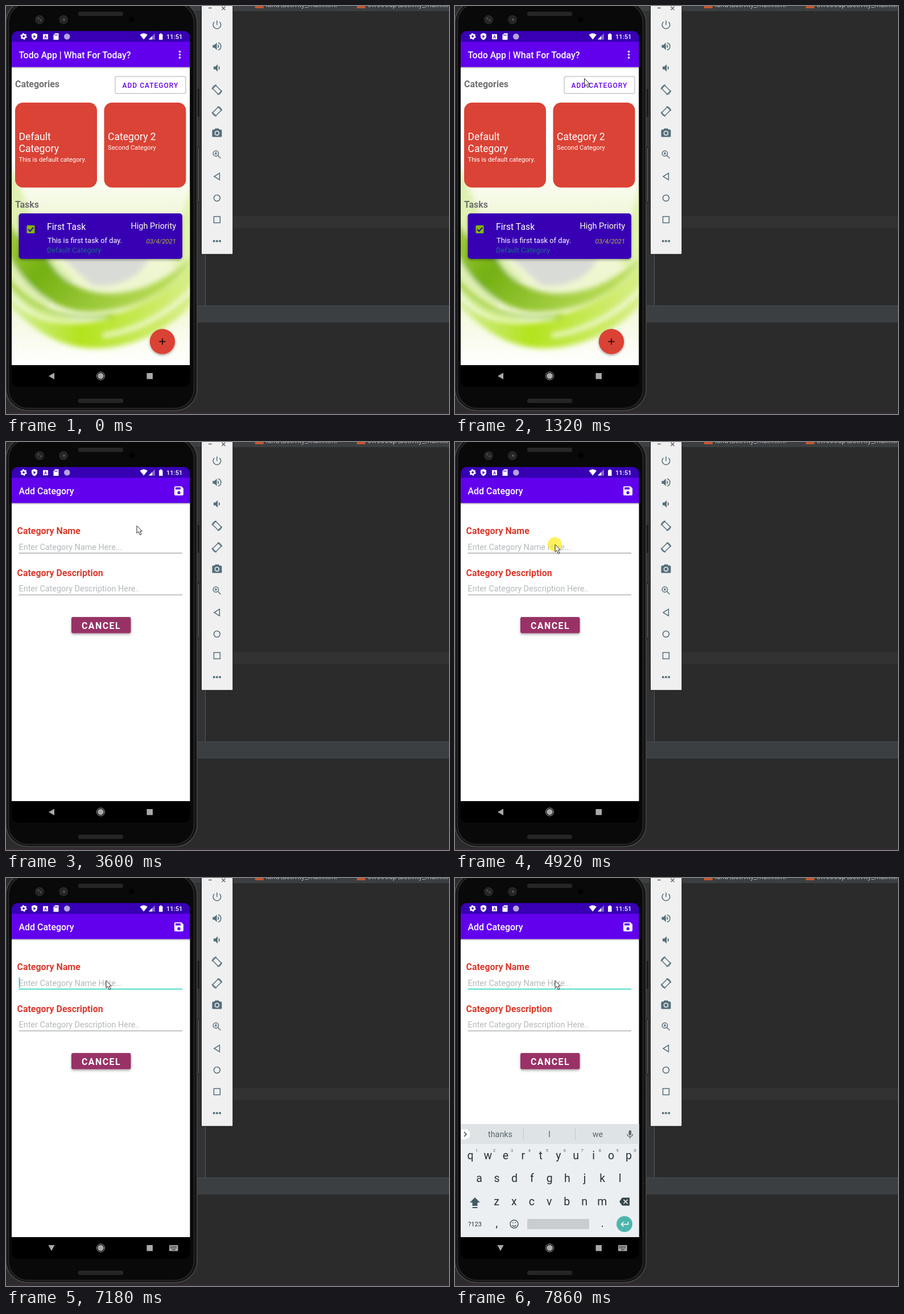
An HTML page that plays this animation: 779 px wide and 718 px high, repeating every 8 s.

```html
<!DOCTYPE html>
<html lang="en">
<head>
<meta charset="utf-8">
<title>Todo App</title>
<style>
  html, body { margin: 0; width: 100%; height: 100%; overflow: hidden; background: #2b2b2b; }
  svg { display: block; width: 100vw; height: 100vh; }
  text { font-family: Roboto, sans-serif; font-size: 11.2px; fill: #fff; white-space: pre; }
  .bold { font-size: 15.95px; font-weight: 700; }
  .title { font-size: 15.95px; font-weight: 500; }
  .gray { fill: #707070; }
  .red { fill: #d93a2d; }
  .card { font-size: 17.6px; }
  .body { font-size: 12.8px; }
  .hint { font-size: 14.4px; fill: #b3b8bb; }
  .mid { text-anchor: middle; }
  .end { text-anchor: end; }
  .line { fill: none; stroke-width: 1.5; }
  #keyboard text { fill: #263238; text-anchor: middle; }
  #keyboard .word { font-size: 14.4px; fill: #5b686e; }
  #keyboard .key { font-size: 19.5px; }
  #keyboard .digit { font-size: 8px; fill: #607078; }
</style>
</head>
<body>
<svg viewBox="0 0 779 718" preserveAspectRatio="none">
  <defs>
    <clipPath id="screen"><rect x="10" y="44" width="313.5" height="626" rx="11"/></clipPath>
    <clipPath id="content"><path d="M10 107H323.500V632H10Z"/></clipPath>
    <filter id="soft" x="-20%" y="-20%" width="140%" height="140%"><feGaussianBlur stdDeviation="5"/></filter>
    <filter id="shadow" x="-30%" y="-30%" width="160%" height="170%">
      <feDropShadow dx="0" dy="2" stdDeviation="2" flood-opacity=".35"/>
    </filter>
    <linearGradient id="wall" x1="0" y1="0" x2="0" y2="1">
      <stop offset=".33" stop-color="#fff"/><stop offset=".5" stop-color="#f0f7d8"/>
      <stop offset=".75" stop-color="#eef6cf"/><stop offset="1" stop-color="#fff"/>
    </linearGradient>
    <linearGradient id="green" x1="0" y1="0" x2="1" y2=".4">
      <stop stop-color="#a9d046"/><stop offset=".35" stop-color="#74b011"/><stop offset="1" stop-color="#b9dc58"/>
    </linearGradient>
    <linearGradient id="lime" x1="0" y1="0" x2="1" y2="0">
      <stop stop-color="#d5eda0"/><stop offset=".4" stop-color="#b3e31c"/><stop offset="1" stop-color="#d8ee8a"/>
    </linearGradient>
    <linearGradient id="drop" x1="0" y1="0" x2="0" y2="1">
      <stop stop-color="#000" stop-opacity=".3"/><stop offset="1" stop-color="#000" stop-opacity="0"/>
    </linearGradient>
  </defs>

  <!-- editor -->
  <path fill="#2b2b2b" d="M0 0H779V718H0Z"/>
  <path fill="#313335" d="M330 10h21V528h-21z"/>
  <path fill="#3c3f41" d="M320 0H779V9H320Z"/>
  <path fill="#323232" d="M337 370H779v21H337z"/>
  <path stroke="#55585a" d="M350.500 437v91"/>
  <path fill="#3c3f41" d="M330 528H779v29H330z"/>
  <path fill="#4a4c4e" d="M330 527H779v1H330z"/>
  <path fill="#352c32" d="M0 715H779v3H0z"/>
  <path fill="#c6562f" d="M438 0h15v4h-15zM617 0h15v4h-15z"/>
  <g style="--c:#aaa">
    <text x="457" y="2" style="font-size:12.500px;fill:#b0b3b5">land\activity_main.xml</text>
    <text x="636" y="2" style="font-size:12.500px;fill:#b0b3b5">sw600dp\activity_main.xml</text>
  </g>

  <!-- emulator toolbar -->
  <path fill="#f0f0f0" stroke="#0c0c0c" d="M343.500-2h55.500V437h-55.500z"/>
  <path class="line" stroke="#666" stroke-width="1" d="M356 3.500h6M379.500 1l6 6m0-6l-6 6"/>
  <g fill="#546e7a" stroke="#546e7a" stroke-width="0" id="tools">
    <path class="line" stroke-width="2" d="M371 25.500v8M366.500 28a6.800 6.800 0 1 0 9 0"/>
    <path d="M363.500 68.500h3.200l4-4v13l-4-4h-3.200zM372.500 67.500a4 4 0 0 1 0 7z"/>
    <path class="line" d="M373 64.700a6.600 6.600 0 0 1 0 12.800"/>
    <path d="M365 106.500h3.200l4-4v13l-4-4H365zM374 105.500a4 4 0 0 1 0 7z"/>
    <g id="rotate">
      <rect class="line" x="-4" y="-7" width="8" height="14" rx="1" transform="rotate(-45)"/>
      <path class="line" d="M-8.500-1A8.500 8.500 0 0 1-1-8.500M8.500 1A8.500 8.500 0 0 1 1 8.500"/>
    </g>
    <path fill-rule="evenodd" d="M368 215.500h6l1.500 2h2.500q1.500 0 1.500 1.500v10q0 1.500-1.500 1.500h-14q-1.500 0-1.500-1.500v-10q0-1.500 1.500-1.500h2.500zM371 219.500a4.300 4.300 0 1 0 .1 0z"/>
    <circle cx="371" cy="223.800" r="2.700"/>
    <circle class="line" cx="369" cy="259.500" r="4.700"/>
    <path class="line" d="M372.500 263l5 5M366.800 259.500h4.400M369 257.300v4.400"/>
    <path class="line" d="M375.500 294v12l-9.500-6z"/>
    <circle class="line" cx="371" cy="338" r="5.500"/>
    <path class="line" d="M365.500 370.500h11v11h-11z"/>
    <path d="M364 412h3.500v3.500H364zM369.200 412h3.500v3.500h-3.500zM374.500 412h3.500v3.500h-3.500z"/>
  </g>

  <!-- phone body -->
  <path fill="#1b1b1b" d="M335 146h5v49h-5zM335 247h5V347h-5z"/>
  <path stroke="#777" d="M338.500 249v96"/>
  <rect x="0" y="-9" width="336" height="721" rx="38" fill="#151515" stroke="#484848" stroke-width="1.500"/>
  <rect x="4.500" y="-5" width="326" height="713" rx="34" fill="#090909" stroke="#2c2c2c" stroke-width="1.500"/>
  <g fill="#262626">
    <rect x="127" y="10" width="79" height="7.500" rx="3"/>
    <rect x="127" y="691" width="79" height="7.500" rx="3"/>
    <circle cx="59" cy="24" r="8"/><circle cx="101" cy="24" r="8"/>
  </g>
  <g fill="#555">
    <circle cx="57" cy="22" r="1.500"/><circle cx="61" cy="25" r="1.500"/>
    <circle cx="102" cy="24" r="2"/>
  </g>
  <circle cx="221" cy="24" r="5" fill="#020202"/>

  <g clip-path="url(#screen)">
    <path d="M10 44H324V670H10Z"/>

    <g id="home" clip-path="url(#content)">
      <path fill="url(#wall)" d="M10 107H324V632H10Z"/>
      <g filter="url(#soft)">
        <path fill="#dff0b2" d="M0 270C30 310 40 400 120 480L60 540 0 500Z"/>
        <path fill="#e2f2b0" d="M335 290C315 350 300 400 290 450L335 520Z"/>
        <path fill="#d9dbd6" d="M95 440H250C245 475 190 500 150 490Z"/>
        <path fill="url(#lime)" d="M0 470C50 550 120 560 180 545S290 500 330 450V520C290 570 220 605 150 602S40 560 0 520Z"/>
        <path fill="url(#green)" d="M0 375C30 420 50 430 72 440 95 490 150 512 200 505 250 500 290 475 330 440 290 510 210 540 140 538 80 535 30 490 0 430Z"/>
      </g>
      <g class="line" filter="url(#soft)" style="opacity:.8">
        <path class="line" stroke="#fff" style="stroke-width:7" d="M0 500C50 565 120 560 175 548"/>
        <path class="line" stroke="#f5fae6" style="stroke-width:9" d="M335 490C290 540 230 572 170 580"/>
        <path class="line" stroke="#8fc41e" style="stroke-width:6" d="M0 480C50 540 110 555 190 545"/>
      </g>
      <text class="bold gray" x="16" y="143">Categories</text>
      <g id="addButton">
        <rect x="192" y="124" width="124" height="30" rx="3" fill="#fff" stroke="#c9c9c9" stroke-width="1.500"/>
        <text x="204.500" y="143.500" style="font-size:12px;font-weight:500;letter-spacing:1px;fill:#6200ee">ADD CATEGORY</text>
      </g>
      <g fill="#da4336">
        <rect x="16" y="170" width="144" height="149.500" rx="14"/>
        <rect x="172.500" y="170" width="144" height="149.500" rx="14"/>
      </g>
      <text class="card" x="22.500" y="236">Default</text>
      <text class="card" x="22.500" y="257">Category</text>
      <text x="22.500" y="274">This is default category.</text>
      <text class="card" x="179" y="236">Category 2</text>
      <text x="179" y="253">Second Category</text>
      <text class="bold gray" x="16" y="355">Tasks</text>
      <rect x="22.500" y="365" width="287.500" height="80" rx="5" fill="#3700b3" filter="url(#shadow)"/>
      <rect x="36.500" y="386" width="14" height="14" rx="1.500" fill="#7fb800"/>
      <path class="line" stroke="#3700b3" style="stroke-width:2" d="M39 393l3.300 3.300 6-6.500"/>
      <text x="72" y="394" style="font-size:15.800px">First Task</text>
      <text class="end" x="299" y="392" style="font-size:14.500px;fill:#fffde4">High Priority</text>
      <text class="body" x="73" y="417">This is first task of day.</text>
      <text class="end" x="299" y="418" style="font-size:11.400px;font-style:italic;fill:#b2b63c">03/4/2021</text>
      <text class="body" x="72" y="434" style="fill:#1c6a8c">Default Category</text>
      <circle cx="275" cy="590.500" r="22.200" fill="#da4336" filter="url(#shadow)"/>
      <path class="line" stroke="#000" d="M269.500 590.500h11m-5.500-5.500v11"/>
    </g>

    <g id="form">
      <path fill="#fff" d="M10 107H324V632H10Z"/>
      <text class="bold red" x="19.500" y="162">Category Name</text>
      <text class="hint" x="22.500" y="190">Enter Category Name Here...</text>
      <path id="nameLine" d="M22.500 195.500H310"/>
      <path id="caret" fill="#1ccfbd" d="M22.700 174.500h1.600v19h-1.600z"/>
      <text class="bold red" x="19.500" y="235.500">Category Description</text>
      <text class="hint" x="22.500" y="263">Enter Category Description Here..</text>
      <path stroke="#8b8b8b" d="M22.500 269H310"/>
      <rect x="115" y="308" width="104.500" height="28.500" rx="3" fill="#983066" filter="url(#shadow)"/>
      <text class="bold" x="133" y="328.500" style="letter-spacing:1.420px">CANCEL</text>
    </g>

    <!-- status and app bars -->
    <path fill="#3700b3" d="M10 44H324V63H10Z"/>
    <path fill="#6200ee" d="M10 63H324v44.500H10Z"/>
    <path fill="url(#drop)" d="M10 107.500H324v3H10Z"/>
    <g fill="#fff">
      <circle cx="31" cy="53.500" r="3.200" fill="none" stroke="#fff" stroke-width="2.600"/>
      <circle cx="31" cy="53.500" r="5" fill="none" stroke="#fff" stroke-width="1.600" stroke-dasharray="2.600 2.636"/>
      <path fill-rule="evenodd" d="M50 47.500l5 2v4q0 4-5 6.500-5-2.500-5-6.500v-4zM48.500 51v5.500l4-2.700z"/>
      <path d="M65 49.500h9v9h-9z"/>
      <path d="M86.500 48h6v11.500h-9V51z"/>
      <circle cx="107.300" cy="53.700" r="5.300" fill="#b5a3e0"/>
      <path d="M235.500 50.500q6.700-5 13.400 0l-6.700 8.500z"/>
      <path d="M262 48v11h-11z" opacity=".4"/><path d="M257 53v6h-6z"/>
      <path d="M269 49.500h2v-1.300h2.500v1.300h2v10H269z"/>
      <circle cx="305.500" cy="80.300" r="1.800" class="dot"/><circle cx="305.500" cy="85.600" r="1.800" class="dot"/><circle cx="305.500" cy="90.900" r="1.800" class="dot"/>
      <path id="save" fill-rule="evenodd" d="M298 78h10.500l3.500 3.500V92q0 2-2 2h-12q-2 0-2-2V80q0-2 2-2zM298 79.800v3.600h9v-3.600zM304 86.600a2.700 2.700 0 1 0 .1 0z"/>
    </g>
    <path stroke="#6200ee" d="M67.500 57l2-5.500 2 5.500m-3.300-2h2.600" fill="none"/>
    <path stroke="#3700b3" d="M86 50v2.500m2-2.500v2.500m2-2.500v2.500"/>
    <text x="282" y="57.500" style="font-weight:500">11:51</text>
    <text id="heading" class="title" x="22.500" y="91.500"></text>

    <g id="keyboard">
      <path fill="#eceff1" d="M10 433H324V632H10Z"/>
      <path fill="#dee3e6" d="M10 433H324v35H10Z"/>
      <circle cx="17" cy="451" r="9.500" fill="#fff"/>
      <path class="line" stroke="#37474f" d="M16 447l4 4-4 4"/>
      <path stroke="#c0c8cc" d="M120.500 441v20M211.500 441v20"/>
      <rect x="305.500" y="444" width="4.500" height="9" rx="2.200" fill="#5b686e"/>
      <path class="line" stroke="#5b686e" d="M303 450.500a4.700 4.700 0 0 0 9.400 0M307.700 455v3.500"/>
      <path fill="#455a64" d="M35 562l9 9h-4.500v6h-9v-6H26zM30.500 579h9v2h-9z"/>
      <path fill="#37474f" d="M294 562.500h13v14h-13l-5-7z"/>
      <path class="line" stroke="#fff" d="M296.500 566l7 7m0-7l-7 7"/>
      <circle class="line" cx="104" cy="609" r="7" stroke="#455a64"/>
      <path class="line" stroke="#455a64" d="M100.500 611q3.500 4 7 0M101 606.500h1.800m2.400 0h1.800"/>
      <rect x="127" y="600" width="109" height="18" rx="2" fill="#c9cdcf"/>
      <circle cx="298" cy="609" r="14" fill="#4db6ac"/>
      <path class="line" stroke="#fff" d="M304.500 605v4.500h-12m4-4l-4 4 4 4"/>
    </g>

    <!-- navigation bar -->
    <g fill="#a9a9a9">
      <path id="back"/>
      <circle cx="166.500" cy="651" r="5.300"/>
      <circle class="line" cx="166.500" cy="651" r="7" stroke="#a9a9a9" style="stroke-width:1"/>
      <path d="M247.500 646h10.500v10.500h-10.500z"/>
      <g id="imeIcon">
        <rect x="287" y="646" width="15.500" height="10.500" rx="1"/>
        <path fill="none" stroke="#111" stroke-width="1.400" stroke-dasharray="1.400 1" d="M288.700 648.500h12M288.700 651h12"/>
        <path stroke="#111" d="M291.500 654h6.500"/>
      </g>
    </g>
  </g>

  <g id="cursor">
    <circle id="press" r="12.500" fill="#ffec28" opacity=".75"/>
    <path fill="#fff" stroke="#222" d="M.5.5V13.500L3.500 10.800 6 16.500 8.500 15.400 6 10H10Z"/>
  </g>
</svg>
<script>
const LOOP = 8000;
const $ = id => document.getElementById(id);
const show = (el, visible) => { el.style.display = visible ? '' : 'none'; };
const within = (t, from, to) => t >= from && t < to;

// Second rotate icon is the mirror of the first.
const rotate = $('rotate');
const mirrored = rotate.cloneNode(true);
mirrored.removeAttribute('id');
rotate.setAttribute('transform', 'translate(371 147.500)');
mirrored.setAttribute('transform', 'translate(371 185.500) scale(-1 1)');
$('tools').append(mirrored);

function addKey(label, x, y, kind) {
  const el = document.createElementNS('http://www.w3.org/2000/svg', 'text');
  el.textContent = label;
  el.setAttribute('x', x);
  el.setAttribute('y', y);
  el.setAttribute('class', kind);
  $('keyboard').append(el);
}
const addRow = (keys, x, y) => [...keys].forEach((key, i) => addKey(key, x + i * 30.95, y, 'key'));
addRow('qwertyuiop', 27, 495);
addRow('asdfghjkl', 42.5, 535);
addRow('zxcvbnm', 73, 576);
[...'1234567890'].forEach((d, i) => addKey(d, 38 + i * 30.95, 482, 'digit'));
addKey('thanks', 79.5, 456, 'word');
addKey('I', 166, 456, 'word');
addKey('we', 251, 456, 'word');
addKey('?123', 35, 613, '');
addKey(',', 73.5, 614, 'key');
addKey('.', 259, 614, 'key');

// Share of a stepped move done at time t; the first step lands at `from`, the last at `to`.
function stepped(t, from, to, steps) {
  const done = Math.floor((t - from) / (to - from) * (steps - 1) + 0.1) + 1;
  return Math.min(Math.max(done / steps, 0), 1);
}

const moves = [
  { from: 230, to: 790, steps: 8, x: 219, y: 102 },
  { from: 1170, to: 1320, steps: 3, x: 227, y: 127 },
  { from: 1400, to: 1630, steps: 4, x: 229.5, y: 147 },
  { from: 4290, to: 4520, steps: 4, x: 175.5, y: 180 },
];
function cursorAt(t) {
  let x = 815, y = 822;
  for (const m of moves) {
    const p = Math.sin(stepped(t, m.from, m.to, m.steps) * Math.PI / 2);
    x += (m.x - x) * p;
    y += (m.y - y) * p;
  }
  return [x, y];
}

function render(t) {
  const adding = t >= 2190, form = t >= 3600, focused = t >= 5240, ime = t >= 6940;
  $('heading').textContent = adding ? 'Add Category' : 'Todo App | What For Today?';
  show($('addButton'), !adding);
  show($('home'), !form);
  show($('form'), form);
  show($('save'), form);
  document.querySelectorAll('.dot').forEach(dot => show(dot, !form));

  $('nameLine').setAttribute('stroke', focused ? '#1ccfbd' : '#8b8b8b');
  $('nameLine').setAttribute('stroke-width', focused ? 1.6 : 1);
  show($('caret'), within(t, 5240, 5620) || within(t, 7180, 7650));

  show($('imeIcon'), ime);
  $('back').setAttribute('d', ime ? 'M74.500 646h11l-5.500 10.500z' : 'M85 645.500v11.500l-10-5.700z');

  const hidden = (1 - stepped(t, 7650, 7860, 4)) ** 2;
  show($('keyboard'), t >= 7650);
  $('keyboard').setAttribute('transform', `translate(0 ${236 * hidden})`);

  $('cursor').setAttribute('transform', `translate(${cursorAt(t)})`);
  show($('press'), within(t, 1950, 2120) || within(t, 4920, 5090));
}

const start = performance.now();
function tick() {
  render((performance.now() - start) % LOOP);
  requestAnimationFrame(tick);
}
tick();
</script>
</body>
</html>
```
